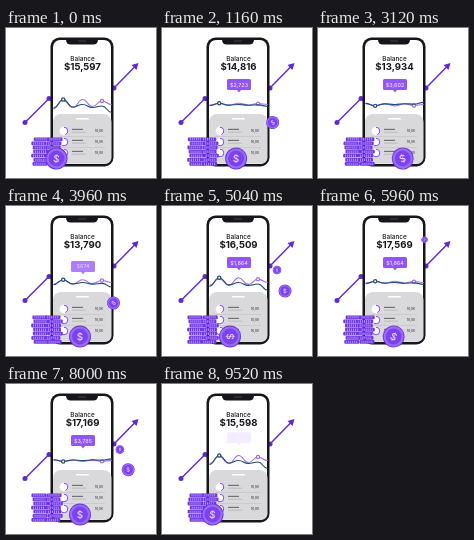
Recreate the animation shown at these times as an HTML page with a canvas. Size 150 by 150 pixels, loop 9.6 s.

```html
<!DOCTYPE html>
<html>
<head>
<meta charset="utf-8">
<style>
html, body { margin: 0; width: 100%; height: 100%; overflow: hidden; background: #fff; }
canvas { display: block; width: 150px; height: 150px; }
</style>
</head>
<body>
<canvas id="stage"></canvas>
<script>
const canvas = document.getElementById('stage');
const ctx = canvas.getContext('2d');
const dpr = window.devicePixelRatio || 1;
canvas.width = canvas.height = 150 * dpr;

const LOOP = 9600, CYCLE = 3020, TIP_START = 820;
const PURPLE = '#7c3ff2', VIOLET = '#5f2bd0', INK = '#17161d', SLATE = '#1e4f68';
const TIMES = [0, 2240, 3960, 5040, 6960, 8000, 9520];
const BALANCE = [15598, 14089, 13787, 16508, 18719, 17170, 15598];
const COIN_X = [50.5, 96, 74, 68, 84, 74, 50.5];
const TIP_VALUES = [3602, 1864, 3785];

const clamp = v => Math.max(0, Math.min(1, v));
const money = v => '$' + Math.round(v).toLocaleString('en-US');

function keyed(t, times, values) {
  let i = 1;
  while (i < times.length - 1 && t > times[i]) i++;
  const p = clamp((t - times[i - 1]) / (times[i] - times[i - 1]));
  return values[i - 1] + (values[i] - values[i - 1]) * p;
}

function box(x, y, w, h, r, fill) {
  ctx.fillStyle = fill;
  ctx.beginPath();
  ctx.roundRect(x, y, w, h, r);
  ctx.fill();
}

function disc(x, y, r, fill) {
  ctx.fillStyle = fill;
  ctx.beginPath();
  ctx.arc(x, y, r, 0, 7);
  ctx.fill();
}

function label(text, x, y, font, fill, align = 'center') {
  ctx.font = font + ' Inter, sans-serif';
  ctx.textAlign = align;
  ctx.fillStyle = fill;
  ctx.fillText(text, x, y);
}

function polyline(points, color, width) {
  ctx.strokeStyle = color;
  ctx.lineWidth = width;
  ctx.beginPath();
  points.forEach(([x, y]) => ctx.lineTo(x, y));
  ctx.stroke();
}

function coin(x, y, r, angle = 0) {
  if (r <= 0) return;
  ctx.save();
  ctx.translate(x, y);
  ctx.rotate(angle);
  ctx.scale(r / 10, r / 10);
  disc(0, 0, 10, '#6a35dc');
  disc(0, 0, 9.2, '#9a6cf8');
  disc(0, 0, 7.2, '#7d42ee');
  label('$', 0, 3.3, '500 9px', '#e5d7ff');
  ctx.restore();
}

function trend() {
  polyline([[19, 94.5], [43, 70.5], [50, 77]], VIOLET, 1.5);
  polyline([[100, 66], [108, 60], [130, 37.5]], VIOLET, 1.5);
  [[19, 94.5], [43, 70.5], [108, 60]].forEach(([x, y]) => disc(x, y, 2.5, VIOLET));
  ctx.fillStyle = VIOLET;
  ctx.beginPath();
  ctx.moveTo(132.5, 35);
  ctx.lineTo(125.5, 37);
  ctx.lineTo(130.5, 42);
  ctx.fill();
}

function wave(offsets, size, color, dot) {
  const pts = offsets.map((o, i) => [47.5 + i * 9.7, 76.5 + o * size]);
  ctx.strokeStyle = color;
  ctx.lineWidth = 1.1;
  ctx.beginPath();
  ctx.moveTo(...pts[0]);
  for (let i = 1; i < pts.length; i++) {
    const [ax, ay] = pts[i - 1], [bx, by] = pts[i], mid = (ax + bx) / 2;
    ctx.bezierCurveTo(mid, ay, mid, by, bx, by);
  }
  ctx.stroke();
  disc(...pts[dot], 2.2, color);
  disc(...pts[dot], 1, '#fff');
}

function card() {
  box(47, 86, 58.5, 49.8, [8, 8, 6, 6], '#d9d9db');
  box(70, 90, 13, 1.6, .8, '#fff');
  [103, 114, 125].forEach((y, i) => {
    disc(58, y, 4.4, '#fff');
    ctx.strokeStyle = PURPLE;
    ctx.lineWidth = 1;
    ctx.beginPath();
    ctx.arc(58, y, 3.8, -1.6, 1.2 + i);
    ctx.stroke();
    box(66, y - 2.2, 11, 1.1, 0, '#66666c');
    box(66, y + .8, 14, .6, 0, '#a2a2a8');
    label('10,00', 97, y + 1, '600 3px', '#44444b', 'right');
    if (i) box(54, y - 5.7, 45, .4, 0, '#bdbdc2');
  });
}

function tooltip(t) {
  const age = (t - TIP_START) % CYCLE;
  const enter = clamp(age / 160), leave = clamp((age - 2500) / 180);
  if (age <= 0 || leave === 1) return;
  const value = TIP_VALUES[Math.floor((t - TIP_START) / CYCLE)];
  const count = 1 - (1 - clamp(age / 1200)) ** 4.22;
  ctx.save();
  ctx.globalAlpha = enter * (1 - leave);
  ctx.translate(77, 56.5 + 16 * (1 - enter) - 3 * leave);
  box(-12, -5.5, 24, 11, 1.5, '#9255f7');
  ctx.beginPath();
  ctx.moveTo(-2, 5.4);
  ctx.lineTo(2, 5.4);
  ctx.lineTo(0, 8);
  ctx.fill();
  label(money(value * count), 0, 2, '500 5.4px', '#f0e6ff');
  ctx.restore();
}

function phone(t) {
  box(44.5, 9.5, 63, 129, 9, INK);
  box(47, 12, 58, 124, 7, '#fff');
  box(60, 10, 32, 6.5, [0, 0, 4.5, 4.5], INK);
  box(72, 12.5, 8, 1, .5, '#45454d');
  label('Balance', 76.5, 33.2, '500 6.4px', INK);
  label(money(keyed(t, TIMES, BALANCE)), 76.5, 41.6, '700 9.6px', INK);
  const size = .2 + .8 * Math.cos(t / LOOP * 4 * Math.PI);
  wave([3, -4, 3, -5, 2, -3.5, 0], size, '#a06bf8', 5);
  wave([4, -5, 2.5, 0, 3, 1.5, 8], size, SLATE, 1);
  card();
  tooltip(t);
}

function stack(t) {
  for (let row = 0; row < 7; row++) {
    for (let col = 0; col < 2; col++) {
      const x = 26.5 + col * 14 + Math.sin(row * 2.3 + col + t / 480) * 1.3;
      const y = 134 - row * 4.1;
      box(x, y, 15, 3.8, 1, '#6f35e0');
      for (let rib = 1; rib < 7; rib++) box(x + rib * 2, y + .7, .8, 2.5, 0, '#bd9dfa');
    }
  }
}

function risingCoins(u) {
  const grow = (from, to) => clamp((u - from) / 140) * clamp((to - u) / 250);
  const times = [780, 940, 2020, 2240, 2450, 2750, 3020];
  coin(keyed(u, times, [103, 107.5, 123, 127, 129, 120, 101]),
       keyed(u, times, [103, 97, 85, 79, 70, 50, 27]),
       6.5 * grow(780, 3060), (u - 2000) / 1500);
  const later = [1500, 2020, 2240, 2700];
  coin(keyed(u, later, [105, 115, 115, 106]),
       keyed(u, later, [78, 64, 62, 38]),
       4.3 * grow(1500, 2750), (u - 2000) / 1200);
}

function draw(t) {
  ctx.setTransform(dpr, 0, 0, dpr, 0, 0);
  ctx.fillStyle = '#fff';
  ctx.fillRect(0, 0, 150, 150);
  trend();
  phone(t);
  risingCoins(t % CYCLE);
  stack(t);
  const x = keyed(t, TIMES, COIN_X);
  coin(x, 130.5, 11, (x - 50) * Math.PI / 12);
}

const start = performance.now();
function frame() {
  draw((performance.now() - start) % LOOP);
  requestAnimationFrame(frame);
}
frame();
</script>
</body>
</html>
```
